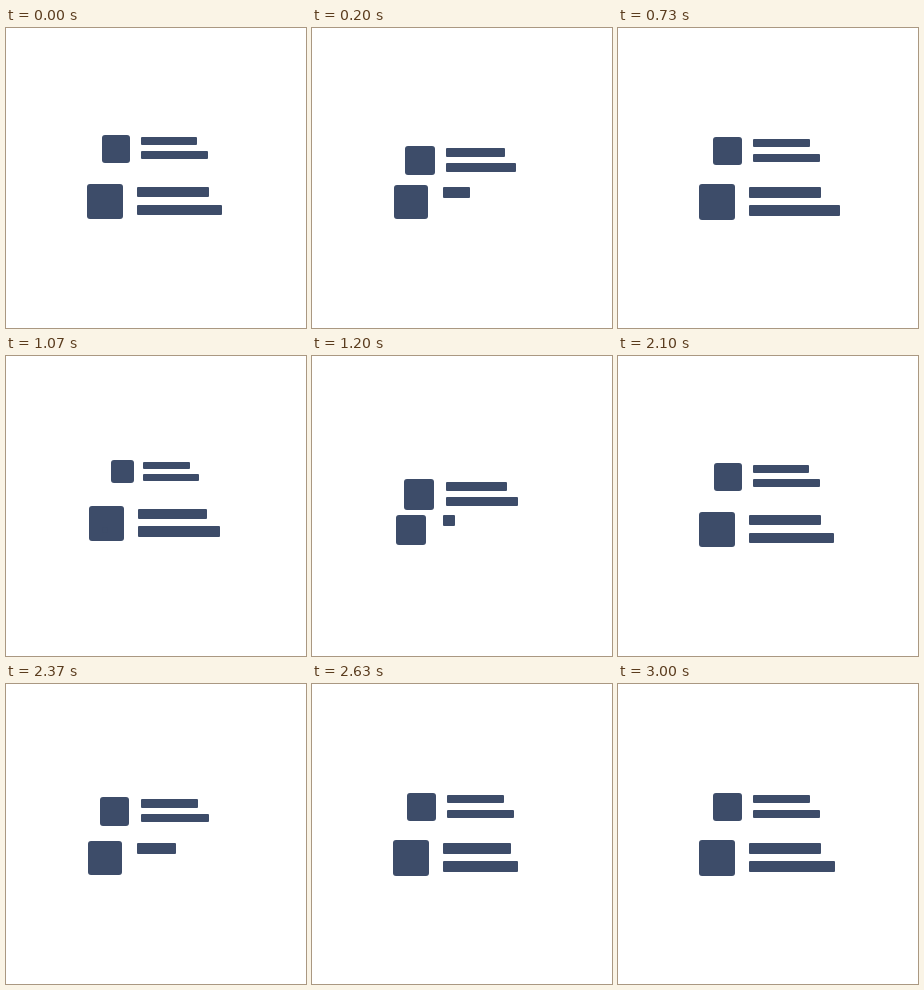
Animation of 300 by 300 pixels, one loop 3030 ms. Source, as an HTML page with a canvas:

```html
<!DOCTYPE html>
<html lang="en">
<head>
<meta charset="utf-8">
<title>List loader</title>
<style>
  html, body { margin: 0; width: 100%; height: 100%; overflow: hidden; background: #fff; }
  canvas { display: block; width: 300px; height: 300px; }
</style>
</head>
<body>
<canvas id="stage" width="300" height="300"></canvas>
<script>
const ctx = document.getElementById('stage').getContext('2d');
const LOOP = 3030, CYCLE = 1050, FPS = 30;
const CENTER_X = 149, LOW_Y = 174, HIGH_Y = 123, HIGH_SCALE = .79;
const LINE_1 = 72, LINE_2 = 85.6;

const clamp = v => Math.max(0, Math.min(1, v));
const span = (t, from, to) => clamp((t - from) / (to - from));
const mix = (a, b, v) => a + (b - a) * v;
const easeOutBack = (v, c = 1.6) => 1 + (c + 1) * (v - 1) ** 3 + c * (v - 1) ** 2;

// Edges are snapped to whole pixels to keep them crisp.
function block(left, top, right, bottom, radius) {
  const [x, y, x2, y2] = [left, top, right, bottom].map(Math.round);
  if (x2 <= x || y2 <= y) return;
  ctx.beginPath();
  ctx.roundRect(x, y, x2 - x, y2 - y, radius);
  ctx.fill();
}

function item(y, scale, box = 1, line1 = LINE_1, line2 = LINE_2) {
  const part = (x, dy, w, h, radius) => block(
    CENTER_X + x * scale, y + dy * scale,
    CENTER_X + (x + w) * scale, y + (dy + h) * scale, radius);
  part(-50 - 18 * box, -18 * box, 36 * box, 36 * box, 3);
  part(-18, -15, line1, 10.5, 1);
  part(-18, 3.4, line2, 10.5, 1);
}

// The upper item shrinks away upwards.
function drawLeaving(t) {
  const left = 1 - span(t, 0, 100);
  item(mix(104, 120.6, left ** 2), .78 * left);
}

// The lower item moves into the upper place.
function drawRising(t) {
  const rest = (1 + Math.cos(Math.PI * span(t, -.9, 420) ** .45)) / 2;
  item(mix(HIGH_Y, LOW_Y, rest), mix(HIGH_SCALE, 1, rest ** 1.15));
}

// A new lower item grows: box first, then each line.
function drawEntering(t) {
  const box = 1 - Math.exp(-t / 78);
  const line1 = LINE_1 * Math.sqrt(span(t, 137, 577));
  const line2 = LINE_2 * easeOutBack(span(t, 400, 860));
  item(LOW_Y, 1, box, line1, line2);
}

function draw(now) {
  const step = Math.min(90, Math.floor((now % LOOP + 5) * FPS / 1000));
  const t = step * 100 / 3 % CYCLE;
  ctx.clearRect(0, 0, 300, 300);
  ctx.fillStyle = '#3d4c69';
  drawLeaving(t);
  drawRising(t);
  drawEntering(t);
}

const start = performance.now();
function tick() {
  draw(performance.now() - start);
  requestAnimationFrame(tick);
}
tick();
</script>
</body>
</html>
```
